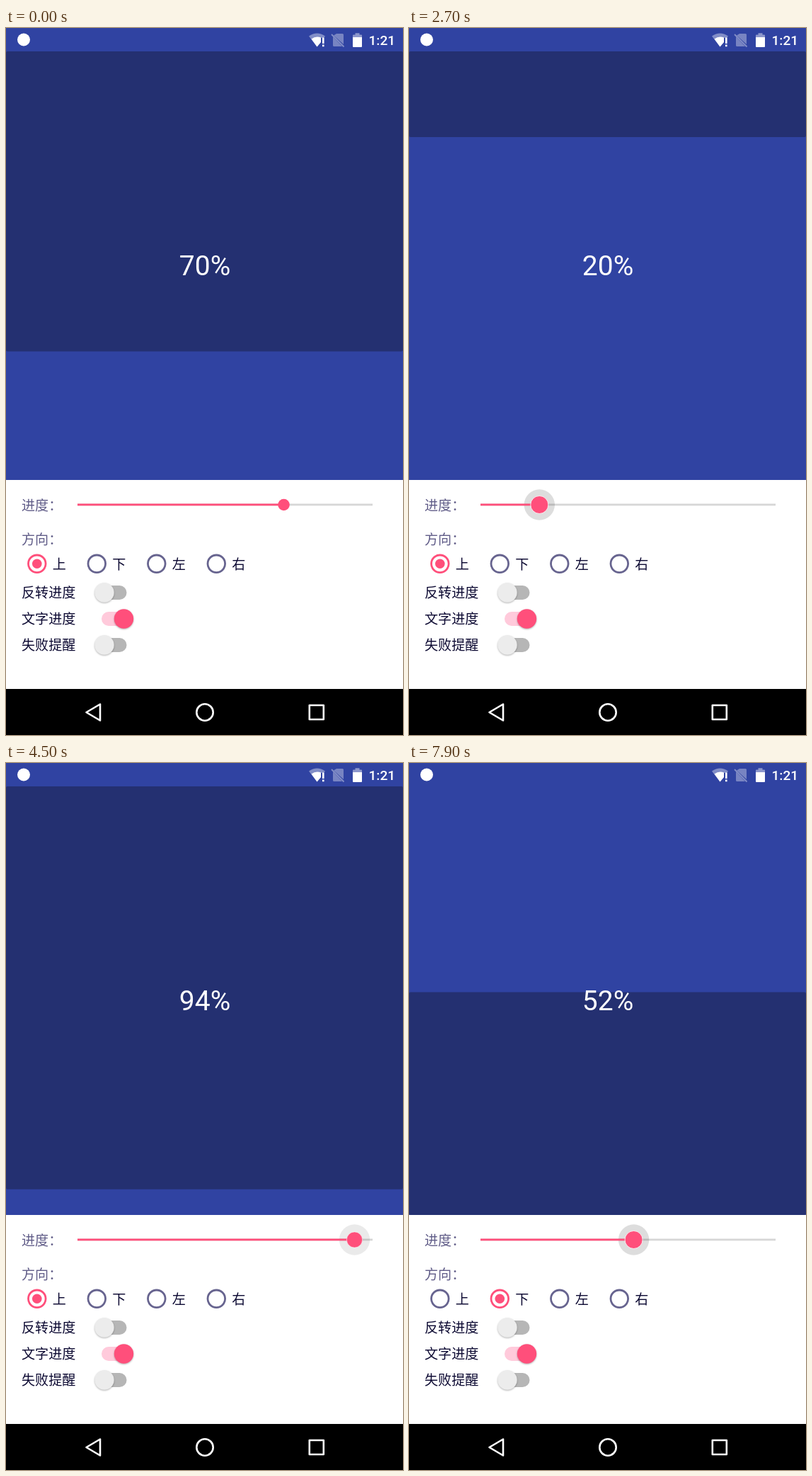
Write an HTML page that moves like this. It is 561 px wide and 998 px high and loops after 8 s.

```html
<!DOCTYPE html>
<html lang="zh-CN">
<head>
<meta charset="utf-8">
<title>进度</title>
<style>
  html, body { margin: 0; width: 100%; height: 100%; overflow: hidden; background: #fff; }
  svg { display: block; width: 100%; height: 100%; }
  text { font: 19.1px "Noto Sans CJK SC", "Noto Sans CJK", "Noto Sans", sans-serif; fill: #0c0932; }
  .label { fill: #5f5b87; }
  .roboto { font-family: Roboto, sans-serif; fill: #fff; }
  .clock { font-size: 19.1px; font-weight: 500; }
  .percent { font-size: 39px; text-anchor: middle; }
  .pink { fill: #ff4f7b; }
  .nav { fill: none; stroke: #fff; stroke-width: 2.6; stroke-linejoin: round; }
  .ring { fill: none; stroke: #67648f; stroke-width: 2.8; }
  .ring.on { stroke: #ff4f7b; }
  .thumb { filter: drop-shadow(0 1.3px 1.3px rgba(0, 0, 0, .3)); }
</style>
</head>
<body>
<svg viewBox="0 0 561 998" preserveAspectRatio="none">
  <rect width="561" height="638" fill="#3043a2"/>
  <rect id="cover" y="33" width="561" rx="2" fill="#243071"/>
  <text id="percent" class="roboto percent" x="281" y="349"></text>

  <!-- status bar -->
  <circle cx="25" cy="16.5" r="9" fill="#fff"/>
  <g fill="#fff">
    <path d="M428 11.5Q439.5 3.5 451 11.5L449 14H445V20L439.5 26.5Z" opacity=".4"/>
    <path d="M431.5 15.5Q438 10.5 445 13.5V20L439.5 26.5Z"/>
    <path d="M447 13.5h2.6v8.4H447zM447 23.6h2.6v2.6H447z"/>
    <path d="M467 8H475.5Q477 8 477 9.5V23L463 10.500ZM462 12.500 475 26H463.500Q462 26 462 24.500Z" opacity=".35"/>
    <path d="M460 9 477.500 26.500" stroke="#fff" stroke-width="1.8" opacity=".4"/>
    <path d="M490 13V10.500Q490 9.500 491 9.500H493.500V7.300H499.500V9.500H502Q503 9.500 503 10.500V13Z" opacity=".45"/>
    <path d="M490 13H503V26Q503 27 502 27H491Q490 27 490 26Z"/>
  </g>
  <text class="roboto clock" x="512.5" y="24">1:21</text>

  <!-- slider -->
  <text class="label" x="22" y="681">进度：</text>
  <circle id="halo" cy="673"/>
  <rect x="101" y="671.5" width="417" height="2.8" fill-opacity=".16"/>
  <rect id="bar" class="pink" x="101" y="671.5" height="2.8"/>
  <circle id="knob" class="pink" cy="673" stroke="#fff"/>

  <text class="label" x="22" y="729">方向：</text>
  <circle id="ripple" cx="128.300" cy="756.3"/>
  <g id="radios"></g>
  <g id="switches"></g>

  <!-- navigation bar -->
  <rect y="933" width="561" height="65"/>
  <path class="nav" d="M113.500 966 133 954.500V977.500Z"/>
  <circle class="nav" cx="281" cy="966" r="11.7"/>
  <rect class="nav" x="428.800" y="956" width="20" height="20"/>
</svg>
<script>
const LOOP = 8000, STEP = 100, SWITCH = 5200;
const TOP = 33, HEIGHT = 605;
const $ = id => document.getElementById(id);
const clamp = v => Math.max(0, Math.min(1, v));
const ramp = (t, from, to) => clamp((t - from) / (to - from));

// [time, percent]
const drag = [
  [0, 70], [1100, 49], [1900, 30], [2400, 18], [2700, 20], [3300, 47],
  [3600, 60], [4400, 94], [5900, 94], [6200, 89], [6800, 77], [7700, 59], [7900, 52]
];

function progress(t) {
  const i = drag.findIndex(k => k[0] >= t);
  if (i < 1) return drag[0][1];
  const [t0, a] = drag[i - 1], [t1, b] = drag[i];
  return Math.round(a + (b - a) * ramp(t, t0, t1));
}

function set(el, attrs) {
  for (const name in attrs) el.setAttribute(name, attrs[name]);
}

$('radios').innerHTML = [...'上下左右'].map((name, i) => {
  const x = 43.8 + i * 84.5;
  return `<circle class="ring" cx="${x}" cy="756.3" r="12.300"/>
    <circle class="pink dot" cx="${x}" cy="756.3" r="0"/>
    <text x="${x + 22}" y="764">${name}</text>`;
}).join('');

$('switches').innerHTML = ['反转进度', '文字进度', '失败提醒'].map((name, i) => {
  const y = 797 + i * 37, on = i === 1;
  return `<text x="22" y="${y + 7}">${name}</text>
    <rect x="135" y="${y - 10}" width="35.500" height="20" rx="10" fill="${on ? '#ffcadb' : '#b6b6b6'}"/>
    <circle class="thumb" cx="${on ? 166.5 : 139}" cy="${y}" r="13.700" fill="${on ? '#ff4f7b' : '#ececec'}"/>`;
}).join('');

const rings = document.querySelectorAll('.ring');
const dots = document.querySelectorAll('.dot');

function draw(t) {
  const p = progress(t), down = t >= SWITCH;
  const h = HEIGHT * p / 100, x = 101 + 4.165 * p;
  set($('cover'), { y: down ? TOP + HEIGHT - h : TOP, height: h });
  $('percent').textContent = p + '%';

  const again = t >= 6000;
  const press = again ? ramp(t, 6200, 6400) : ramp(t, 0, 200);
  const release = again ? 0 : ramp(t, 4400, 4600);
  const size = again ? press : press * (1 - ramp(t, 4400, 4700));
  set($('halo'), { cx: x, r: 21.7 * press, 'fill-opacity': .135 * (1 - .8 * release) * (t > 4500 && !again ? 0 : 1) });
  set($('bar'), { width: x - 101 });
  set($('knob'), { cx: x, r: 8.3 + 4.2 * size, 'stroke-opacity': .8 * size });

  const pick = ramp(t, SWITCH - 100, SWITCH + 200);
  set($('ripple'), {
    r: 23 * ramp(t, 5000, 5250),
    'fill-opacity': .13 * (1 - ramp(t, 5300, 5700))
  });
  rings[0].classList.toggle('on', !down);
  rings[1].classList.toggle('on', down);
  set(dots[0], { r: down ? 6.8 * (1 - pick) : 6.8 });
  set(dots[1], { r: down ? 6.8 * pick : 0 });
}

function tick(now) {
  draw(Math.floor(now % LOOP / STEP) * STEP);
  requestAnimationFrame(tick);
}
draw(0);
requestAnimationFrame(tick);
</script>
</body>
</html>
```
